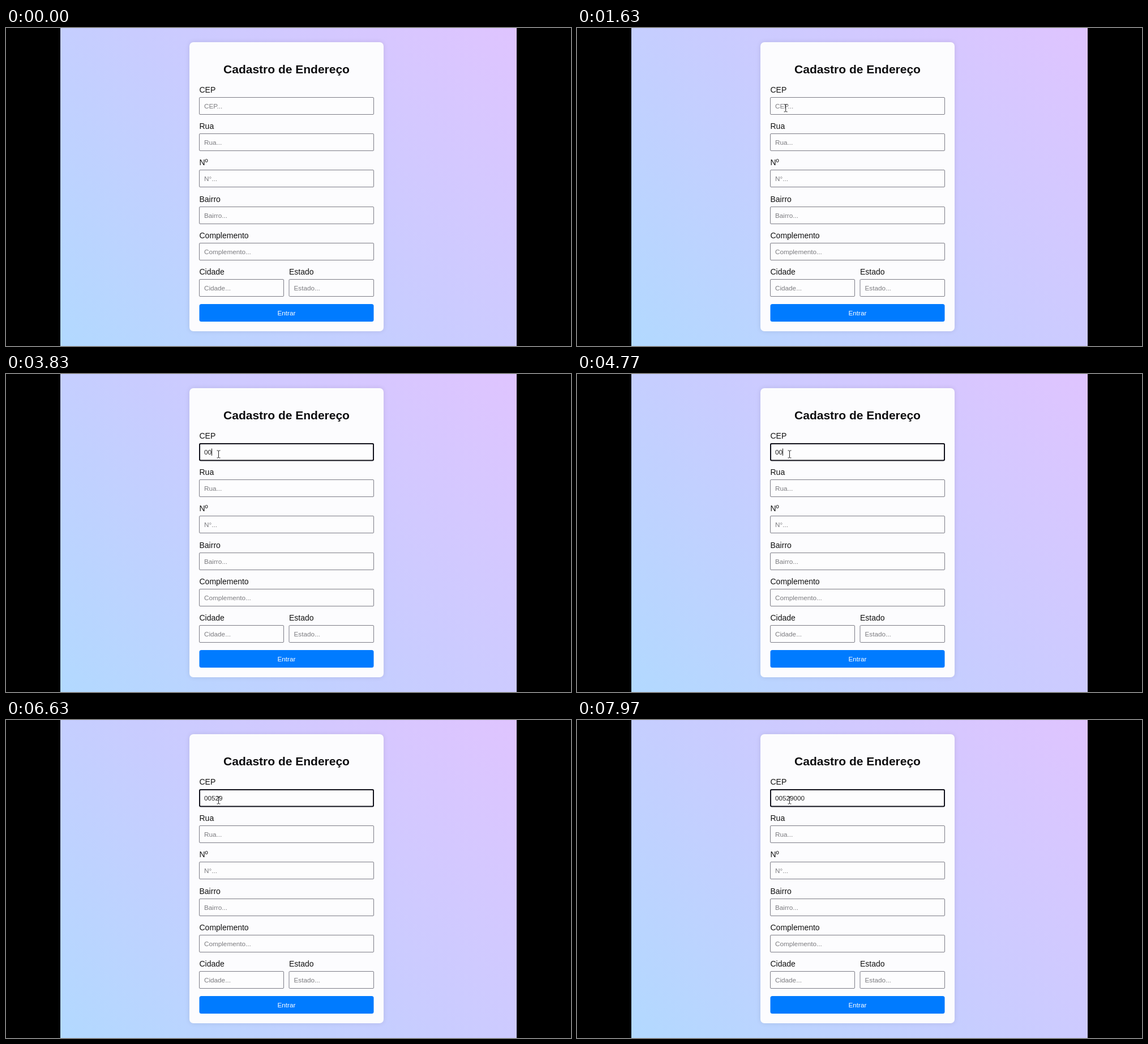
Recreate the animation shown at these times as an HTML page. Size 998 by 561 pixels, loop 8 s.

```html
<!DOCTYPE html>
<html lang="pt-BR">
<head>
<meta charset="utf-8">
<style>
  html, body { margin: 0; width: 100%; height: 100%; overflow: hidden; background: #000; }
  #page { position: absolute; left: 96px; top: 0; width: 806px; height: 561px;
    background: linear-gradient(45deg, #b2d9ff, #c9ccff 50%, #dfc4ff); }
  #card { position: absolute; left: 324px; top: 25px; width: 343px; height: 510px;
    border-radius: 7px; background: #fcfcfe; box-shadow: 0 0 9px rgba(0, 0, 0, .1); }
  svg { position: absolute; left: 0; top: 0; }
  text { font-family: "Liberation Sans", Arial, sans-serif; font-size: 11.73px; fill: #222; }
  .title { font-size: 21px; font-weight: bold; fill: #0c0c0e; text-anchor: middle; }
  .label { font-size: 14px; fill: #111; }
  .hint { fill: #7b7b7f; }
  .box { fill: #fdfdfe; stroke: #7c7c86; }
  .focused { stroke: #10101a; stroke-width: 2; }
  .button { fill: #fff; text-anchor: middle; }
</style>
</head>
<body>
<div id="page"></div>
<div id="card"></div>
<svg width="998" height="561" viewBox="0 0 998 561">
  <text class="title" x="495.5" y="80">Cadastro de Endereço</text>
  <g id="fields"></g>
  <rect x="341.5" y="487" width="308" height="31" rx="3.5" fill="#007bff"/>
  <text class="button" x="495.5" y="507">Entrar</text>
  <rect id="focus" class="box focused" x="342" y="123" width="307" height="29.5" rx="2"/>
  <text id="hint" class="hint" x="350" y="142">CEP...</text>
  <text id="value" x="350" y="142"></text>
  <path id="caret" d="M0 131.5V144" stroke="#111"/>
  <path id="arrow" d="M0 0V14.5L3.3 11.5L5.5 16.5L7.8 15.5L5.7 10.6H10Z" fill="#fff" stroke="#111" stroke-width=".9"/>
  <path id="beam" d="M-3 -6.5H-1L0 -5.5L1 -6.5H3M0 -5.5V5.5M-3 6.5H-1L0 5.5L1 6.5H3" fill="none" stroke="#222"/>
</svg>
<script>
const $ = id => document.getElementById(id);
const show = (el, on) => el.setAttribute('visibility', on ? 'visible' : 'hidden');

const LEFT = 341.5, ROW = 64.2;
const addField = (row, label, x = LEFT, width = 308, hint = label + '...') => {
  const top = Math.floor(122.4 + ROW * row) + .5;
  const hintText = row ? `<text class="hint" x="${x + 8.5}" y="${top + 19.5}">${hint}</text>` : '';
  $('fields').innerHTML += `<text class="label" x="${x}" y="${Math.round(114 + ROW * row)}">${label}</text>
    <rect class="box" x="${x}" y="${top}" width="${width}" height="30" rx="1.5"/>${hintText}`;
};
addField(0, 'CEP');
addField(1, 'Rua');
addField(2, 'Nº', LEFT, 308, 'N°...');
addField(3, 'Bairro');
addField(4, 'Complemento');
addField(5, 'Cidade', LEFT, 149);
addField(5, 'Estado', 500, 149.5);

const LOOP = 8000, FOCUS = 2100, BLINK = 500;
const CODE = '00529000', DIGIT_WIDTH = 6.52;
const KEYS = [3480, 3700, 5150, 5650, 5950, 6950, 7150, 7350];
const PATH = [[850, 97, 92], [1030, 209, 130], [1300, 290, 139], [1660, 375, 141]];

function pointerAt(t) {
  const next = PATH.findIndex(p => p[0] > t);
  if (next < 0) return PATH[PATH.length - 1].slice(1);
  const [t0, x0, y0] = PATH[next - 1], [t1, x1, y1] = PATH[next];
  const k = (t - t0) / (t1 - t0);
  return [x0 + (x1 - x0) * k, y0 + (y1 - y0) * k];
}

function draw(t) {
  const typed = KEYS.filter(k => k <= t).length;
  const lastAction = typed ? KEYS[typed - 1] : FOCUS;
  const focused = t >= FOCUS;
  show($('focus'), focused);
  show($('hint'), !typed);
  $('value').textContent = CODE.slice(0, typed);
  show($('caret'), focused && (t - lastAction) % (2 * BLINK) < BLINK);
  $('caret').setAttribute('transform', `translate(${Math.floor(350 + typed * DIGIT_WIDTH) + .5})`);

  const present = t >= PATH[0][0];
  const [x, y] = present ? pointerAt(t) : [0, 0];
  const overField = x > LEFT;
  show($('arrow'), present && !overField);
  show($('beam'), present && overField);
  $('arrow').setAttribute('transform', `translate(${x} ${y})`);
  $('beam').setAttribute('transform', `translate(${x + .5} ${y + .5})`);
}

const start = performance.now();
function tick() {
  draw((performance.now() - start) % LOOP);
  requestAnimationFrame(tick);
}
tick();
</script>
</body>
</html>
```
